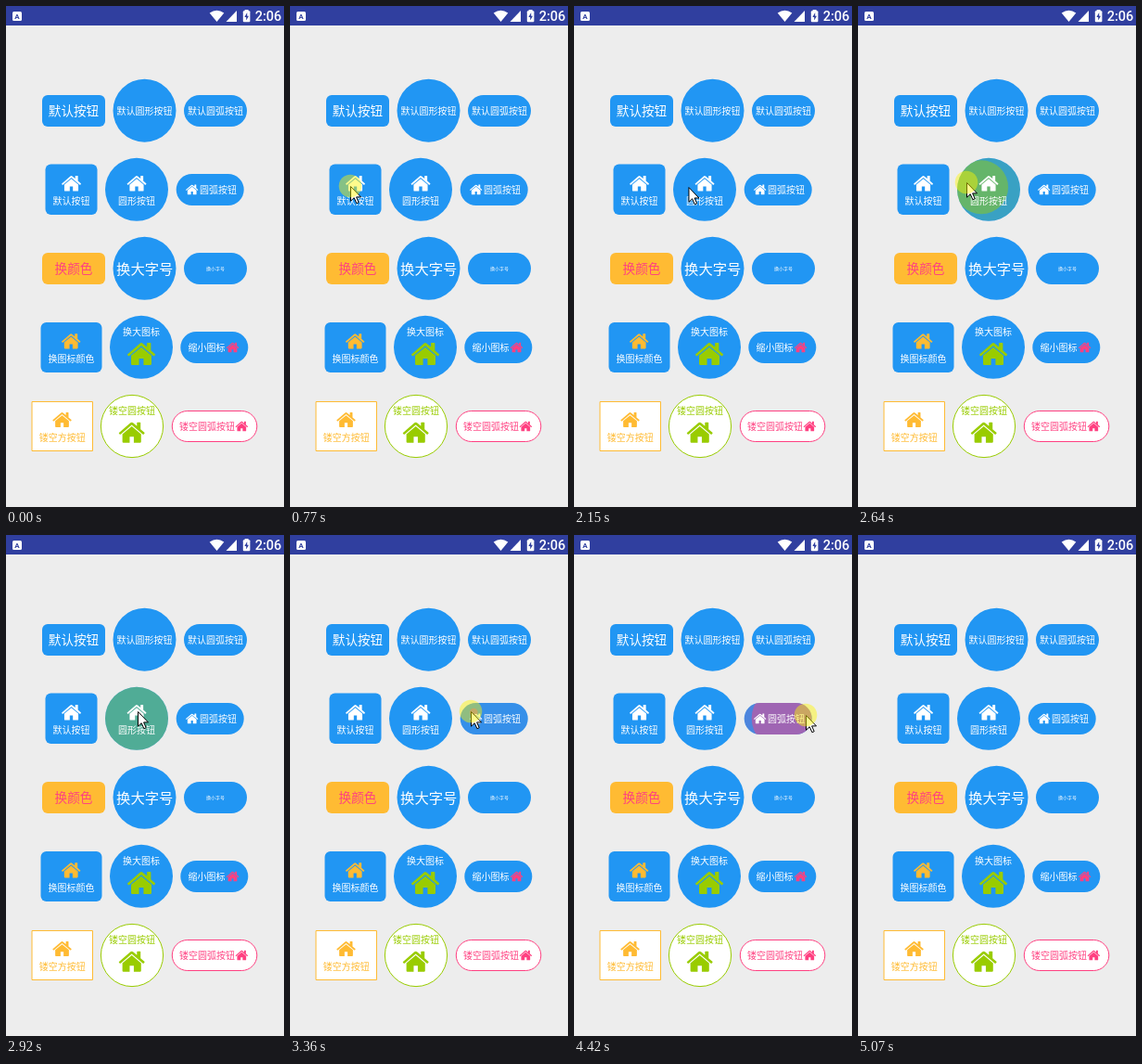
Write an HTML page with a canvas that moves like this. It is 300 px wide and 540 px high and loops after 5300 ms.

```html
<!DOCTYPE html>
<html lang="zh">
<head>
<meta charset="utf-8">
<style>
  html, body { margin: 0; width: 100%; height: 100%; overflow: hidden; background: #ededed; }
  canvas { display: block; width: 300px; height: 540px; }
</style>
</head>
<body>
<canvas id="stage"></canvas>
<script>
const W = 300, H = 540, LOOP = 5300;
const BLUE = '#2196f3', ORANGE = '#ffbb33', GREEN = '#99cc00', PINK = '#ff4081', WHITE = '#fff';
const CJK = '"Noto Sans CJK SC", "Noto Sans CJK JP", "Noto Sans CJK", sans-serif';

const canvas = document.getElementById('stage');
const ctx = canvas.getContext('2d');
const dpr = window.devicePixelRatio || 1;
canvas.width = W * dpr;
canvas.height = H * dpr;

// House icon, 100 units wide and 79 high
const house = new Path2D(
  'M1 41L45 2.5Q50 -1.5 55 2.5L70 15V2Q70 0 72 0H82Q84 0 84 2V27L99 40Q100.500 41.500 99 43' +
  'L96 46.500Q94.500 47.500 93 46.500L50 10.500L7 46.500Q5.500 47.500 4 46.500L1 43Q-.500 42 1 41Z' +
  'M14 45.500L50 16L86 45.500V75Q86 79 82 79H58V55.500H42V79H18Q14 79 14 75Z');

const arrow = new Path2D('M.5 .5V16.200L4.200 12.700L6.900 18.700L9.200 17.700L6.600 11.900H11.500Z');

function box(x, y, w, h, r) {
  const p = new Path2D();
  p.roundRect(x, y, w, h, r);
  return { path: p, cx: x + w / 2, cy: y + h / 2, reach: Math.hypot(w, h) / 2 };
}
const disc = (cx, cy, r = 34) => box(cx - r, cy - r, 2 * r, 2 * r, r);

// text: [string, cx, cy, size, color]; icon: [cx, cy, width, color]
const buttons = [
  { shape: box(39, 96, 68, 34, 6), text: ['默认按钮', 73, 113, 13.6] },
  { shape: disc(149.5, 112.7), text: ['默认圆形按钮', 149.5, 113, 10] },
  { shape: box(192, 96, 68, 34, 17), text: ['默认圆弧按钮', 226, 113, 10] },

  { shape: box(42.5, 170.5, 56, 54.5, 6), text: ['默认按钮', 70.5, 210.3, 10], icon: [70.5, 191.2, 21] },
  { shape: disc(141, 197.8), text: ['圆形按钮', 141, 210.3, 10], icon: [141, 191.2, 21] },
  { shape: box(183.7, 181, 73, 34, 17), text: ['圆弧按钮', 229, 198.2, 10], icon: [200.7, 197.9, 13.5] },

  { shape: box(39, 266, 68, 34, 6), fill: ORANGE, text: ['换颜色', 73, 283.2, 13.6, PINK] },
  { shape: disc(149.5, 282.8), text: ['换大字号', 149.7, 283.2, 15.3] },
  { shape: box(192, 266, 68, 34, 17), text: ['换小字号', 226, 283, 5] },

  { shape: box(37.5, 341, 66, 54, 6), text: ['换图标颜色', 70.5, 380.4, 10], icon: [70.2, 361.3, 20.5, ORANGE] },
  { shape: disc(146, 367.8), text: ['换大图标', 146, 351, 10], icon: [146, 375, 30.5, GREEN] },
  { shape: box(188.3, 351, 73, 34, 17), text: ['缩小图标', 216.5, 368.2, 10], icon: [244.5, 368, 13.5, PINK] },

  { shape: box(28, 426.5, 65.500, 53, 0), line: ORANGE, text: ['镂空方按钮', 60.7, 465.2, 10, ORANGE], icon: [60.5, 446, 20.5, ORANGE] },
  { shape: disc(136, 453, 33.6), line: GREEN, text: ['镂空圆按钮', 136, 436.2, 10, GREEN], icon: [135.7, 459.7, 28, GREEN] },
  { shape: box(179.3, 436.5, 91.500, 33, 16.5), line: PINK, text: ['镂空圆弧按钮', 217, 453.2, 10, PINK], icon: [254.3, 453, 13.5, PINK] }
];

// Touch ripples: start and release times, touch point
const ripples = [
  { on: buttons[3], color: ORANGE, x: 65, y: 194, start: 885, end: 980 },
  { on: buttons[3], color: ORANGE, x: 58, y: 197, start: 1665, end: 1760 },
  { on: buttons[4], color: GREEN, x: 117, y: 190, start: 2325, end: 2750 },
  { on: buttons[5], color: PINK, x: 195, y: 190, start: 3290, end: 3400 },
  { on: buttons[5], color: PINK, x: 250, y: 195, start: 3965, end: 4415 }
];
const FADE = 370;

const halos = [[770, 1010], [1520, 1740], [2270, 2740], [3250, 3480], [3870, 4390]];

// Pointer path: [time, x, y]
const route = [
  [30, 214, 472], [390, 61, 163], [490, 65, 194], [1020, 65, 194], [1300, 58, 197],
  [1750, 58, 197], [2180, 126, 195], [2285, 117, 190], [2770, 117, 190], [3070, 195, 190],
  [3490, 195, 190], [3720, 252, 193], [3860, 250, 194], [4425, 250, 194],
  [4890, 284, 520], [5070, 284, 532]
];

// Bursts of evenly spaced picture changes: [first, last, count]
const bursts = [
  [30, 490, 9], [770, 770, 1], [910, 1420, 9], [1520, 1520, 1], [1680, 2180, 11], [2230, 2740, 10],
  [2790, 3070, 7], [3250, 3770, 12], [3820, 4340, 10], [4370, 4890, 11], [4970, 5070, 3]
];

const clamp = v => Math.max(0, Math.min(1, v));

function snap(t) {
  let held = 0;
  for (const [a, b, n] of bursts) {
    if (t < a) break;
    const step = n > 1 ? (b - a) / (n - 1) : 1;
    held = Math.min(b, a + Math.floor((t - a) / step + 1e-6) * step);
  }
  return held;
}

function pointer(t) {
  let i = 1;
  while (i < route.length - 1 && t > route[i][0]) i++;
  const [t0, x0, y0] = route[i - 1], [t1, x1, y1] = route[i];
  const p = clamp((t - t0) / (t1 - t0)), k = p * p * (3 - 2 * p);
  return [x0 + (x1 - x0) * k, y0 + (y1 - y0) * k];
}

function circle(x, y, r) {
  ctx.beginPath();
  ctx.arc(x, y, r, 0, Math.PI * 2);
  ctx.fill();
}

function poly(color, ...pts) {
  ctx.fillStyle = color;
  ctx.beginPath();
  for (let i = 0; i < pts.length; i += 2) ctx.lineTo(pts[i], pts[i + 1]);
  ctx.fill();
}

function drawStatusBar() {
  ctx.fillStyle = '#303f9f';
  ctx.fillRect(0, 0, W, 21);
  ctx.fillStyle = WHITE;
  ctx.beginPath();
  ctx.roundRect(7, 6, 10, 10, 1.5);
  ctx.fill();
  ctx.fillStyle = '#303f9f';
  ctx.font = '700 8px Roboto, sans-serif';
  ctx.textAlign = 'center';
  ctx.fillText('A', 12, 13.8);

  ctx.fillStyle = WHITE;
  ctx.beginPath();
  ctx.moveTo(227.5, 17);
  ctx.lineTo(219.7, 7.5);
  ctx.quadraticCurveTo(227.5, 2.2, 235.3, 7.5);
  ctx.fill();
  poly(WHITE, 249, 5, 249, 17, 237.5, 17);
  ctx.fillRect(257.6, 4, 4, 2);
  ctx.beginPath();
  ctx.roundRect(255.8, 5.2, 7.6, 12, 1);
  ctx.fill();
  poly('#303f9f', 260.2, 7, 257.4, 12, 259.2, 12, 259.2, 15.6, 262, 10.7, 260.2, 10.7);

  ctx.fillStyle = WHITE;
  ctx.font = '500 14.5px Roboto, sans-serif';
  ctx.textAlign = 'left';
  ctx.fillText('2:06', 268.7, 16.2);
}

function drawRipple(r, t) {
  if (t < r.start || t > r.end + FADE) return;
  const { path, cx, cy, reach } = r.on.shape;
  const after = Math.max(0, t - r.end);
  const p = clamp((t - r.start) / 500 + after / 250);
  const k = 1 - Math.pow(1 - p, 1.2);
  const alpha = 1 - after / FADE;
  ctx.save();
  ctx.clip(path);
  ctx.fillStyle = r.color;
  ctx.globalAlpha = 0.2 * alpha * clamp((t - r.start) / 120);
  ctx.fill(path);
  ctx.globalAlpha = 0.46 * alpha;
  circle(r.x + (cx - r.x) * k, r.y + (cy - r.y) * k, reach * p);
  ctx.restore();
}

function drawButton(b, t) {
  ctx.fillStyle = b.line ? WHITE : b.fill || BLUE;
  ctx.fill(b.shape.path);
  if (b.line) {
    ctx.strokeStyle = b.line;
    ctx.lineWidth = 1;
    ctx.stroke(b.shape.path);
  }
  for (const r of ripples) if (r.on === b) drawRipple(r, t);

  const [str, x, y, size, color = WHITE] = b.text;
  ctx.fillStyle = color;
  ctx.font = size + 'px ' + CJK;
  ctx.textAlign = 'center';
  ctx.fillText(str, x, y + size * 0.38);

  if (b.icon) {
    const [ix, iy, w, tint = WHITE] = b.icon, s = w / 100;
    ctx.save();
    ctx.translate(ix - w / 2, iy - 39.5 * s);
    ctx.scale(s, s);
    ctx.fillStyle = tint;
    ctx.fill(house);
    ctx.restore();
  }
}

function drawPointer(t) {
  if (t < 30 || t >= 5069) return;
  const [x, y] = pointer(t);
  ctx.save();
  ctx.translate(x, y);
  ctx.fillStyle = WHITE;
  ctx.fill(arrow);
  ctx.strokeStyle = '#000';
  ctx.lineWidth = 1;
  ctx.stroke(arrow);
  ctx.restore();
  if (halos.some(([a, b]) => t >= a && t < b)) {
    ctx.fillStyle = 'rgba(255, 246, 0, 0.45)';
    circle(x, y, 12.3);
  }
}

function draw(t) {
  ctx.setTransform(dpr, 0, 0, dpr, 0, 0);
  ctx.fillStyle = '#ededed';
  ctx.fillRect(0, 0, W, H);
  drawStatusBar();
  for (const b of buttons) drawButton(b, t);
  drawPointer(t);
}

const begin = performance.now();
function tick() {
  draw(snap((performance.now() - begin) % LOOP));
  requestAnimationFrame(tick);
}
tick();
</script>
</body>
</html>
```
